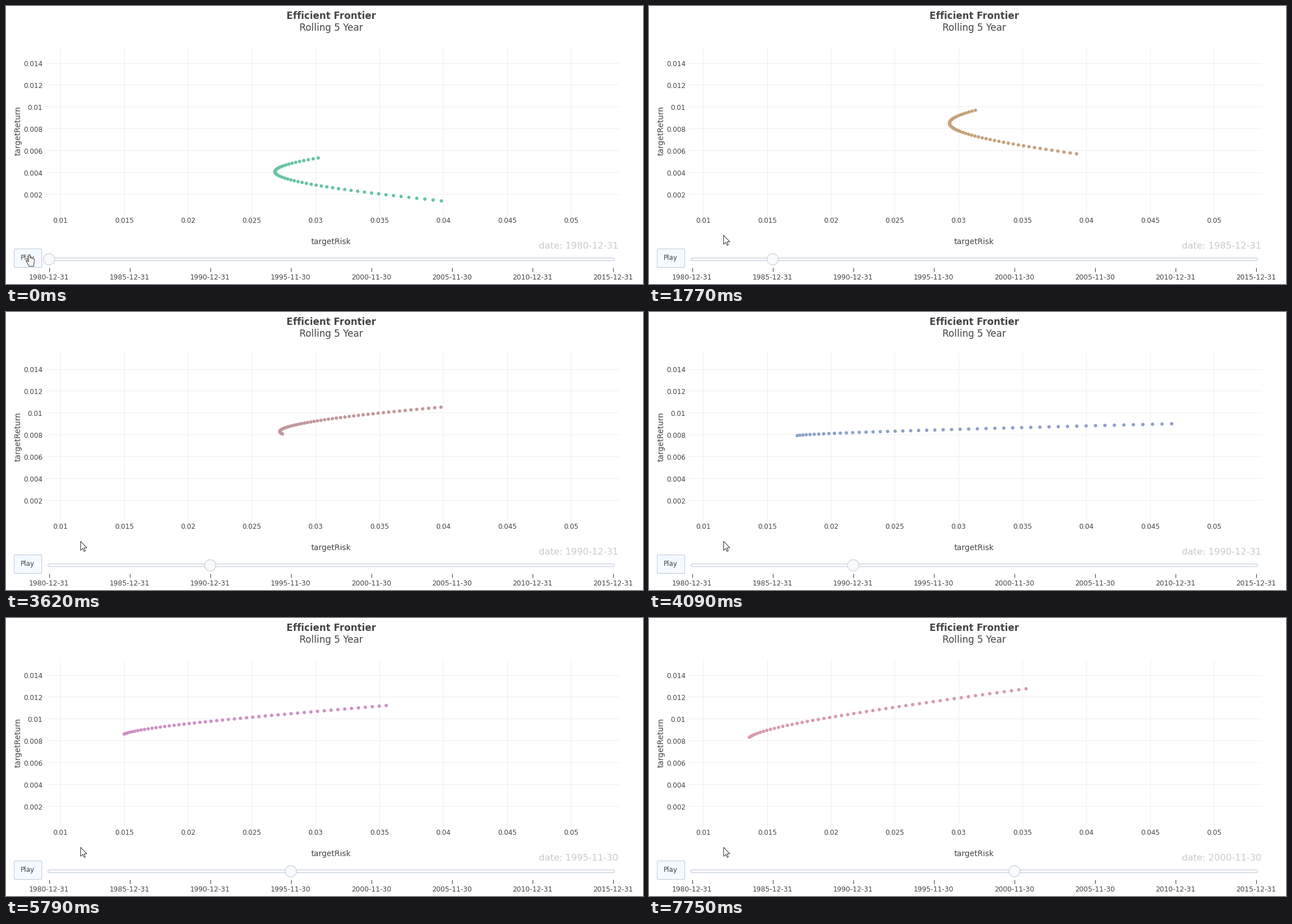
A matplotlib script that plays this animation: 1131x495 px, repeating every 8000 ms.

```python
import numpy as np
import matplotlib.pyplot as plt
from matplotlib.animation import FuncAnimation
from matplotlib.colors import to_rgb
from matplotlib.patches import Circle, FancyBboxPatch, Polygon

W, H, DPI = 1131, 495, 100
LOOP, INTERVAL = 8000, 40
PX = 72 / DPI  # points per pixel

plt.rcParams["font.family"] = "DejaVu Sans"
INK, GRID, BORDER = "#444444", "#eeeeee", "#bec8d9"

fig = plt.figure(figsize=(W / DPI, H / DPI), dpi=DPI, facecolor="white")
ax = fig.add_axes([0, 0, 1, 1])
ax.set_xlim(0, W)
ax.set_ylim(H, 0)
ax.axis("off")


def label(x, y, text, size, color=INK, ha="center", **kw):
    return ax.text(x, y, text, fontsize=size * PX, color=color, ha=ha,
                   va="baseline", **kw)


def line(x, y, color):
    ax.plot(x, y, color=color, lw=PX, solid_capstyle="butt")


def rounded_box(x0, y0, x1, y1, radius, face):
    ax.add_patch(FancyBboxPatch(
        (x0, y0), x1 - x0, y1 - y0, fc=face, ec=BORDER, lw=PX, zorder=3,
        boxstyle=f"round,pad=0,rounding_size={radius}"))


# Titles, grid and axes
label(577.7, 22.8, "Efficient Frontier", 16.6, weight="bold")
label(577.5, 44.5, "Rolling 5 Year", 16.8)
label(577, 423.6, "targetRisk", 13.8)
label(26, 222.5, "targetReturn", 13.8, rotation=90, rotation_mode="anchor")

for i in range(9):
    x = 96.4 + 113.32 * i
    line([x, x], [72, 372], GRID)
    label(x, 386.4, f"{round(0.01 + 0.005 * i, 3):g}", 12)
for i in range(7):
    y = 101.5 + 38.95 * i
    line([70, 1088], [y, y], GRID)
    label(64.8, y + 5.5, f"{round(0.014 - 0.002 * i, 3):g}", 12, ha="right")

# Slider and button
SLIDER_X, SLIDER_STEP, SLIDER_Y = 76.5, 143.07, 451


def date(i):
    year = 1980 + 5 * i
    return f"{year}-11-30" if 1995 <= year <= 2005 else f"{year}-12-31"


for i in range(8):
    x = SLIDER_X + SLIDER_STEP * i
    line([x, x], [466, 472.5], "#333333")
    label(x, 487.4, date(i), 12.2)
rounded_box(74.5, 448.5, 1080.5, 453.5, 2.4, "#f8fafc")
rounded_box(14.5, 432.5, 63.5, 465.5, 2, "#f4faff")
label(38.5, 452, "Play", 11.9, zorder=4)
grip = ax.add_patch(Circle((SLIDER_X, SLIDER_Y), 10, fc="#f8fafc", ec=BORDER,
                           lw=PX, zorder=5))
date_text = label(1087.3, 431.8, "", 16.2, color="#cacac6", ha="right")

# Frontier curves: evenly spaced returns, hyperbolic risk
COUNT = 50
ZERO_RISK_X = -130.7


def frontier(start, end, vertex):
    """Points from start to end; vertex is the index of least risk."""
    i = np.arange(COUNT)
    s0, s1 = start[0] - ZERO_RISK_X, end[0] - ZERO_RISK_X
    bend = (i - vertex)**2 - vertex**2
    risk = np.sqrt(s0**2 + (s1**2 - s0**2) * bend / bend[-1])
    return np.column_stack([risk + ZERO_RISK_X,
                            np.linspace(start[1], end[1], COUNT)])


CURVES = [
    frontier((773, 347), (554.3, 270.6), 33.3),
    frontier((751, 214), (594.3, 135.8), 35.7),
    frontier((263.3, 219.9), (928, 199), -4.8),
    frontier((189.3, 201.5), (577.7, 139.2), -4.4),
    frontier((178.3, 212.4), (669.4, 126), -3.8),
]
COLORS = [np.array(to_rgb(c)) for c in
          ("#66c2a5", "#fc8d62", "#8da0cb", "#e78ac3", "#d99aa9")]
dots = ax.scatter(*CURVES[0].T, s=(6 * PX)**2, linewidths=0, zorder=3)

# Mouse pointer shapes, relative to the hot spot
ARROW = np.array([(0, 0), (0, 16), (3.8, 12.6), (6.2, 18), (8.4, 17),
                  (6.1, 11.7), (11, 11.5)])
HAND = np.array([(-1.5, 1), (0, 0), (1.5, 1), (1.5, 6), (7.5, 7), (9, 9),
                 (7.5, 21), (-.5, 21), (-6, 11), (-4, 10.5), (-1.5, 13)])
POINTER_FROM, POINTER_TO = np.array((41.5, 442.5)), np.array((132.5, 408.3))
POINTER_START, POINTER_TIME = 430, 610
BUTTON_EDGE = 63.5
pointer = ax.add_patch(Polygon(ARROW, fc="white", ec="#333333", lw=PX,
                               joinstyle="round", zorder=8))

# Each step changes the date; grip and dots follow after a short lag
STEPS = [(1190, 825), (3070, 900), (5170, 748), (7180, 490)]  # start, length
LAG, GRIP_TIME = 80, 160


def progress(t, start, length):
    return min(max((t - start) / length, 0), 1)


def cubic_in_out(u):
    return 4 * u**3 if u < 0.5 else 1 - 4 * (1 - u)**3


def draw(n):
    t = n * INTERVAL + 30

    stage = sum(progress(t, start + LAG, length) for start, length in STEPS)
    i = min(int(stage), len(CURVES) - 2)
    f = stage - i
    dots.set_offsets(CURVES[i] * (1 - f) + CURVES[i + 1] * f)
    # One colour per dot keeps the dots from snapping to whole pixels
    dots.set_facecolor([COLORS[i] * (1 - f) + COLORS[i + 1] * f] * COUNT)

    moved = sum(cubic_in_out(progress(t, start + LAG, GRIP_TIME))
                for start, _ in STEPS)
    grip.center = (SLIDER_X + SLIDER_STEP * moved, SLIDER_Y)
    date_text.set_text(f"date: {date(sum(t >= start for start, _ in STEPS))}")

    u = np.sin(progress(t, POINTER_START, POINTER_TIME) * np.pi / 2)
    spot = POINTER_FROM + (POINTER_TO - POINTER_FROM) * u
    pointer.set_xy((HAND if spot[0] < BUTTON_EDGE else ARROW) + spot)
    return dots, grip, date_text, pointer


anim = FuncAnimation(fig, draw, frames=LOOP // INTERVAL, interval=INTERVAL,
                     init_func=lambda: draw(0), repeat=True, repeat_delay=0)
plt.show()
```
